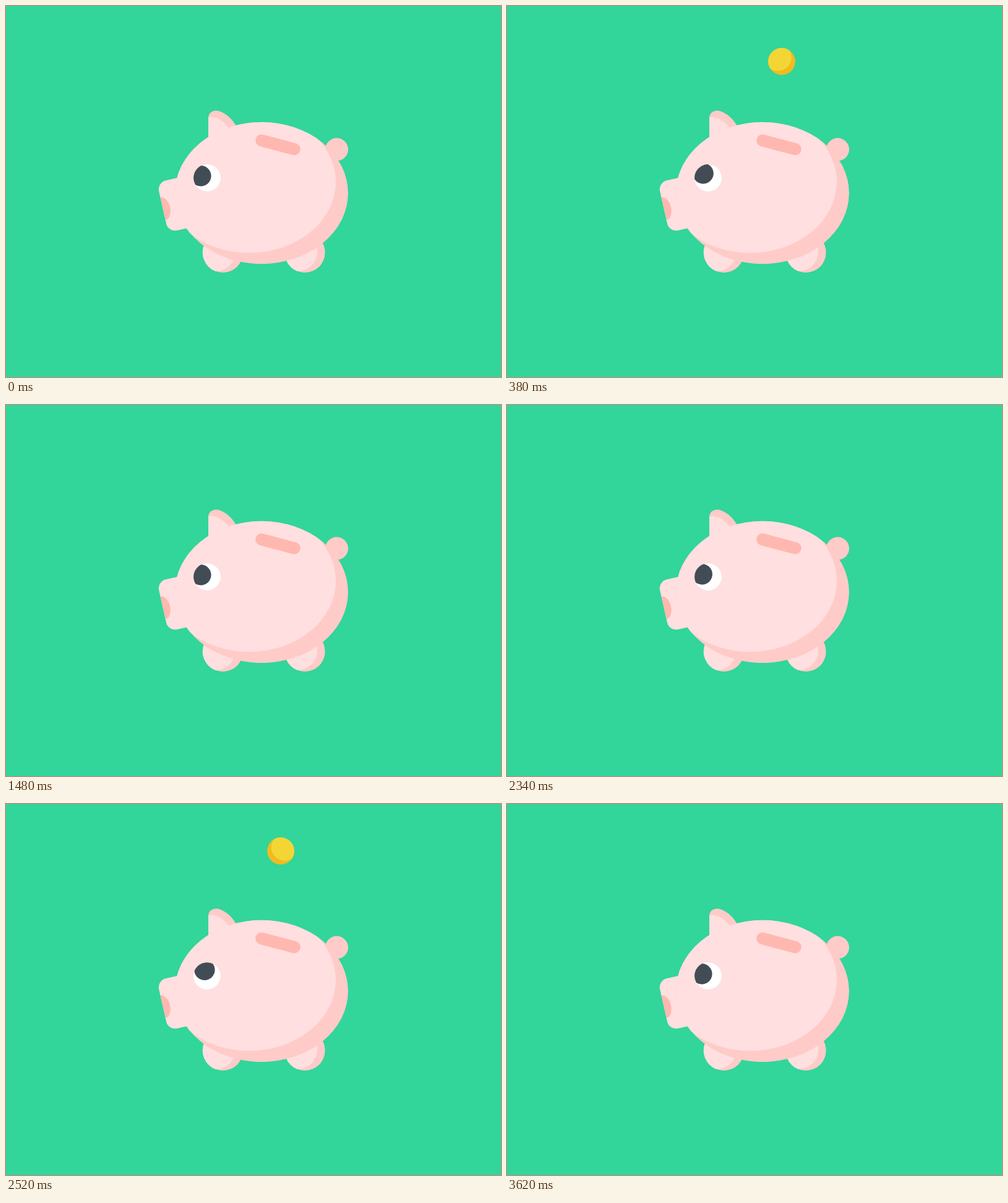
Animation of 800 by 600 pixels, one loop 3.95 s. Source, as an HTML page:

```html
<!DOCTYPE html>
<html lang="en">
<head>
<meta charset="utf-8">
<title>Piggy bank</title>
<style>
  html, body { margin: 0; width: 100%; height: 100%; overflow: hidden; background: #32d59a; }
  svg { display: block; width: 100%; height: 100%; }
  .light { fill: #ffdfdf; }
  .shade { fill: #ffcbc8; }
  .deep { fill: #ffb8b0; }
</style>
</head>
<body>
<svg viewBox="0 0 800 600">
  <defs>
    <path id="snout" d="M290 275 257.6 282.3A14.5 14.5 0 0 0 247.1 299.2L259 351.9A14.5 14.5 0 0 0 276.2 362.9L293 359.2 330 340Z"/>
    <clipPath id="snoutClip"><use href="#snout"/></clipPath>
    <clipPath id="bodyClip"><ellipse cx="413" cy="302.5" rx="140" ry="114.8"/></clipPath>
    <clipPath id="legClip"><circle r="32.8"/></clipPath>
    <clipPath id="coinClip"><circle r="22"/></clipPath>
    <clipPath id="eyeClip"><circle cy="0.4" r="22"/></clipPath>
    <clipPath id="slotClip">
      <path d="M380-60H500V231H475.7A9.75 9.75 0 0 1 463.5 240.9L410.5 226.9A9.75 9.75 0 0 1 403 217H380Z"/>
    </clipPath>
    <g id="leg" clip-path="url(#legClip)">
      <circle class="shade" r="32.8"/>
      <circle class="light" cx="-12.5" cy="-2" r="32.8"/>
    </g>
  </defs>

  <rect width="800" height="600" fill="#32d59a"/>
  <circle class="shade" cx="534.5" cy="232" r="18.5"/>
  <use href="#leg" x="350.5" y="398.5"/>
  <use href="#leg" x="483" y="398.5"/>
  <path class="shade" d="M327 216V181C327 172 335 168 343 169.5Q361 175 372 194L366 216Z"/>
  <path class="light" d="M327 216V180Q344 177 360 197L366 216Z"/>
  <use href="#snout" class="light"/>
  <g clip-path="url(#bodyClip)">
    <ellipse class="shade" cx="413" cy="302.5" rx="140" ry="114.8"/>
    <ellipse class="light" cx="393" cy="284.4" rx="140" ry="114.8"/>
  </g>
  <g clip-path="url(#snoutClip)">
    <ellipse class="deep" cx="254.3" cy="327.8" rx="11" ry="18.5" transform="rotate(-13 254.3 327.8)"/>
  </g>
  <path d="M413 217.5 466 231.5" stroke="#ffb8b0" stroke-width="19.5" stroke-linecap="round"/>

  <g id="eye"><g clip-path="url(#eyeClip)">
    <circle cy="0.4" r="22" fill="#fff"/>
    <circle cy="-10.3" r="16.7" fill="#424c55"/>
  </g></g>

  <g clip-path="url(#slotClip)">
    <g id="coin"><g clip-path="url(#coinClip)">
      <circle r="22" fill="#f0bb20"/>
      <circle cx="-6.5" cy="-6.5" r="22" fill="#f3d635"/>
    </g></g>
  </g>
</svg>
<script>
  const LOOP = 3950, REST = -73, TOSS = 510;
  const BACK_FROM = 1010, BACK_FOR = 260;
  // Each toss: start in the loop, and how far into the move it begins.
  const tosses = [{ at: 200, lead: 0 }, { at: 2340, lead: 60 }];
  // Gaze angle from straight up, by time into the toss.
  const gaze = [[0, REST], [60, -67], [180, -48], [240, -22], [510, 45], [570, 58]];

  const eye = document.getElementById('eye');
  const coin = document.getElementById('coin');
  const clamp = (v, lo, hi) => Math.min(hi, Math.max(lo, v));
  const easeInOut = p => (1 - Math.cos(Math.PI * p)) / 2;
  const place = (el, x, y, angle) =>
    el.setAttribute('transform', `translate(${x} ${y}) rotate(${angle})`);

  function gazeAt(ms) {
    const i = clamp(gaze.findIndex(k => k[0] >= ms), 1, gaze.length - 1);
    const [t0, a0] = gaze[i - 1], [t1, a1] = gaze[i];
    return a0 + (a1 - a0) * (ms - t0) / (t1 - t0);
  }

  function draw(t) {
    const toss = t >= tosses[1].at ? tosses[1] : tosses[0];
    const since = t - toss.at;
    const ms = since + toss.lead;

    let angle = REST;
    if (since >= 0) {
      angle = gazeAt(Math.min(since, TOSS) + toss.lead);
      const back = easeInOut(clamp((since - BACK_FROM) / BACK_FOR, 0, 1));
      angle += (REST - angle) * back;
    }
    place(eye, 324.7, 277.8, angle);

    // The coin hops out of the slot, hangs, and drops back in.
    const drop = Math.abs(ms - 285) / 223;
    const flying = since >= 0 && since < TOSS && drop < 1;
    coin.setAttribute('visibility', flying ? 'visible' : 'hidden');
    if (flying) place(coin, 444, 75.2 + 180 * Math.pow(drop, 3.3), (ms - 180) * 1.5);
  }

  const start = performance.now();
  function tick() {
    draw((performance.now() - start) % LOOP);
    requestAnimationFrame(tick);
  }
  tick();
</script>
</body>
</html>
```
